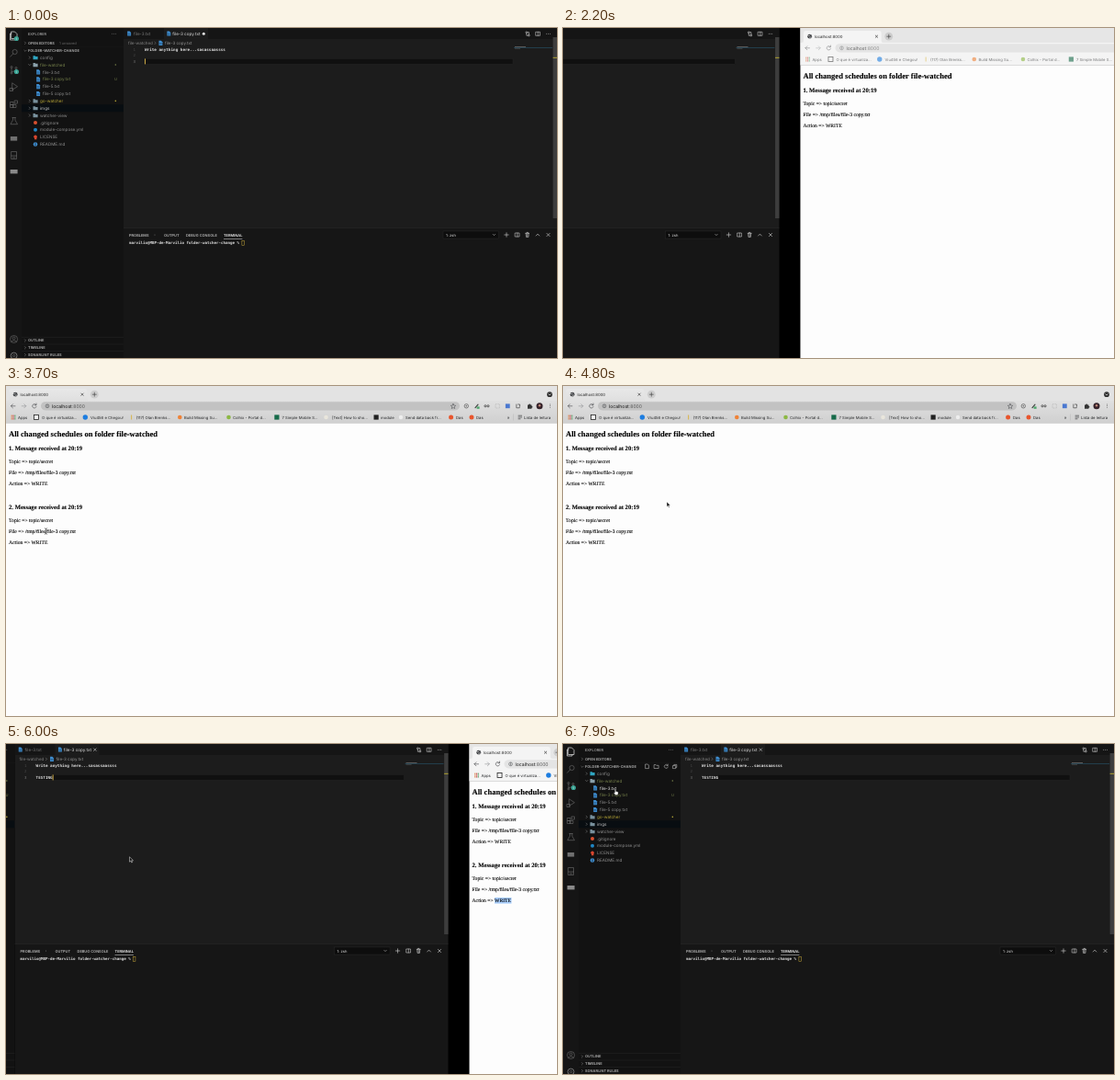
An HTML page that plays this animation: 600 px wide and 359 px high, repeating every 8000 ms.

```html
<!DOCTYPE html>
<html lang="en">
<head>
<meta charset="utf-8">
<title>Folder watcher</title>
<style>
html, body { margin: 0; width: 100%; height: 100%; overflow: hidden; background: #000; }
svg { display: block; width: 100vw; height: 100vh; }
text { font-family: Inter, Roboto, sans-serif; text-rendering: geometricPrecision; white-space: pre; }
.mono { font-family: "DejaVu Sans Mono", "Liberation Mono", monospace; }
.page { font-family: "Liberation Serif", "Noto Serif", serif; stroke: #000; stroke-width: .1; }
.b { font-weight: 700; }
.m { font-weight: 600; }
.line { fill: none; stroke-linecap: round; stroke-linejoin: round; }
</style>
</head>
<body>
<svg id="stage" viewBox="0 0 600 359" preserveAspectRatio="none"></svg>
<script>
const FRAME = 100, LOOP = 8000, SPACE = 623;

// Drawing helpers
const rect = (x, y, w, h, fill, extra = '') =>
  `<rect x="${x}" y="${y}" width="${w}" height="${h}" fill="${fill}" ${extra}/>`;
const dot = (x, y, r, fill) => `<circle cx="${x}" cy="${y}" r="${r}" fill="${fill}"/>`;
const line = (d, color, w = .6) => `<path class="line" d="${d}" stroke="${color}" stroke-width="${w}"/>`;
const text = (x, y, size, fill, str, cls = '', id = '') =>
  `<text x="${x}" y="${y}" font-size="${size}" fill="${fill}" class="${cls}" id="${id}">${str}</text>`;
const group = (id, body, extra = '') => `<g id="${id}" ${extra}>${body}</g>`;
const cross = (x, y, r, c) => line(`M${x - r} ${y - r}l${2 * r} ${2 * r}m0 ${-2 * r}l${-2 * r} ${2 * r}`, c);
const plus = (x, y, r, c) => line(`M${x - r} ${y}h${2 * r}M${x} ${y - r}v${2 * r}`, c);
const ring = (x, y, r, c, w = .6) =>
  `<circle cx="${x}" cy="${y}" r="${r}" fill="none" stroke="${c}" stroke-width="${w}"/>`;
const dots = (x, y, c) => [-1.8, 0, 1.8].map(d => dot(x + d, y, .45, c)).join('');
const chevron = (x, y, open, c) =>
  line(open ? `M${x - 1.2} ${y - .6}l1.2 1.2l1.2 -1.2` : `M${x - .6} ${y - 1.2}l1.2 1.2l-1.2 1.2`, c, .5);
const doc = (x, y) =>
  `<path d="M${x - 1.8} ${y - 2.6}h2.4l1.5 1.5v3.7h-3.9z" fill="#3f8fd2"/>` +
  line(`M${x - .9} ${y}h2M${x - .9} ${y + 1.2}h2`, '#123', .35);
const folder = (x, y, c) =>
  `<path d="M${x - 2.5} ${y - 2}h2l.8 .8h2.3v3.3h-5.1z" fill="${c}"/>`;
const split = (x, y, c) => line(`M${x - 2.2} ${y - 2}h4.4v4h-4.4zM${x} ${y - 2}v4`, c, .55);

// Editor window
const UI = '#8f8f8f', LIGHT = '#d6d6d6', TEAL = '#3aa394';

function activityBar() {
  const c = '#707070', badge = y => dot(11.4, y, 2.6, TEAL) + text(10.6, y + 1.2, 3.2, '#fff', '1');
  return rect(0, 0, 17, 359, '#151515') +
    line('M6 4h3.5l2.5 2.5v5h-6zM6 6h-1.5v7h5.5v-1.5', '#e2e2e2', .7) +
    group('dirty1', badge(11.5)) +
    ring(9.6, 26, 2.6, c) + line('M7.7 28l-3 3.2', c) +
    ring(6, 42.5, 1, c) + ring(6, 49, 1, c) + ring(11, 43.5, 1, c) +
    line('M6 43.5v4.5M11 44.5q0 2.5 -4.5 3', c) + badge(47.5) +
    line('M7 60l5.5 3.7l-5.5 3.5zM4.5 65.5h3v3h-3z', c) +
    line('M5 80.5h3v3h-3zM5 83.5h3v3h-3zM8 83.5h3v3h-3zM9.5 79h3v3h-3z', c) +
    line('M7 97.5h3.4M7.5 97.5v2.6l-2.6 4.6h7.6l-2.6 -4.6v-2.6', c) +
    rect(4.8, 118, 7.4, 4.6, '#707070') +
    line('M6 134.5h5.5v8h-5.5zM6 139h5.5M7.4 141h2.5', c) +
    rect(4.6, 154, 8, 4.4, '#8a8a8a') +
    ring(8.6, 338.5, 4, c) + ring(8.6, 337.5, 1.4, c) + line('M5.8 341.3q2.8 -3 5.6 0', c) +
    ring(8.6, 356.5, 3.4, c, 1) + ring(8.6, 356.5, 1.2, c);
}

function tree() {
  const row = i => 32.2 + i * 7.86;
  const label = (i, x, s, c, id) => text(x, row(i) + 1.6, 4.6, c, s, '', id);
  const dir = (i, s, c, icon, open) =>
    chevron(25.8, row(i), open, UI) + folder(32, row(i), icon) + label(i, 37, s, c);
  const file = (i, s, c, id) => doc(35, row(i)) + label(i, 40, s, c, id);
  const plain = '#919191', olive = '#78834c';
  return rect(17, row(7) - 4, 111, 8, '#080d11') +
    dir(0, 'config', plain, '#2fa5c0') +
    dir(1, 'file-watched', olive, '#8aa0aa', true) + dot(119.3, row(1), .8, olive) +
    file(2, 'file-3.txt', plain, 'hover') +
    file(3, 'file-3 copy.txt', olive) + text(118, row(3) + 1.4, 4, olive, 'U') +
    file(4, 'file-5.txt', plain) +
    file(5, 'file-5 copy.txt', plain) +
    dir(6, 'go-watcher', '#b9a938', '#78909c') + dot(119.3, row(6), .8, '#b9a938') +
    dir(7, 'imgs', '#c4c4c4', '#78909c') +
    dir(8, 'watcher-view', plain, '#78909c') +
    dot(32, row(9), 2, '#d9502f') + label(9, 37, '.gitignore', plain) +
    dot(32, row(10), 2, '#1f86c4') + label(10, 37, 'module-compose.yml', plain) +
    dot(32, row(11) - .4, 1.8, '#d9472f') + rect(31, row(11), 2.4, 2.6, '#d9472f') +
    label(11, 37, 'LICENSE', plain) +
    dot(32, row(12), 2.3, '#3f8fd2') + line(`M32 ${row(12) - .2}v1.4M32 ${row(12) - 1.3}v.1`, '#111') +
    label(12, 37, 'README.md', plain);
}

function sideBar() {
  const head = (y, s, open) => chevron(21, y - 1.4, open, UI) + text(24, y, 3.95, '#a5a5a5', s, 'b');
  const tools = line('M90 22h2.4l1 1v3.6h-3.4zM99.5 22.6h1.6l.6 .7h2.4v3.2h-4.6z', LIGHT, .5) +
    line('M114 23.2a2 2 0 1 0 .3 1.8M114.2 22v1.4h-1.4', LIGHT, .5) +
    line('M119.8 23.6h3v3h-3zM120.8 23.4v-1h3v3h-1', LIGHT, .5);
  return rect(17, 0, 111, 359, '#121212') +
    text(24, 7.7, 3.95, '#c2c2c2', 'EXPLORER') + dots(117.5, 6.3, UI) +
    head(17.7, 'OPEN EDITORS') + text(58, 17.7, 4, '#676767', '1 unsaved', '', 'dirty2') +
    line('M17 20.6h111', '#1d1d1d', .4) + head(26.2, 'FOLDER-WATCHER-CHANGE', true) +
    group('tools', tools) + tree() +
    [336, 343.8, 351.6].map((y, i) => rect(17, y, 111, .4, '#2a2a2a') +
      head(y + 5.4, ['OUTLINE', 'TIMELINE', 'SONARLINT RULES'][i])).join('');
}

function editor() {
  return rect(128, 0, 472, 218, '#1c1c1c') + rect(128, 0, 472, 12, '#151515') +
    rect(172, 0, 48, 12, '#1c1c1c') +
    doc(134, 6) + text(139, 7.8, 4.6, '#7b7b7b', 'file-3.txt') +
    doc(177.2, 6) + text(181.3, 7.8, 4.6, '#e4e4e4', 'file-3 copy.txt') +
    group('dirty3', dot(215.3, 6.2, 1.5, '#e4e4e4')) + group('saved', cross(215.3, 6.2, 1.3, LIGHT)) +
    ring(566.8, 4.8, .9, LIGHT) + ring(569.4, 8, .9, LIGHT) + line('M566.8 5.8v2.4h1.4M569.4 7v-2.4h-1.4', LIGHT) +
    split(579.3, 6.3, LIGHT) + dots(590.5, 6.3, LIGHT) +
    text(133, 18, 4.5, '#838383', 'file-watched') + chevron(162.5, 16.4, false, UI) +
    doc(168.3, 16.4) + text(173, 18, 4.5, '#979797', 'file-3 copy.txt') +
    rect(151, 33.2, 401, 6.3, '#101010', 'stroke="#292929" stroke-width=".4"') +
    [1, 2, 3].map(n => text(138.5, 18.4 + n * 6.43, 4.1, n > 2 ? '#777' : '#484848', n, 'mono')).join('') +
    text(151, 24.8, 4.3, '#e0e0e0', 'Write anything here...sasassaassss', 'mono m') +
    text(151, 37.9, 4.3, '#e0e0e0', '', 'mono m', 'typed') +
    rect(151, 33.4, .9, 6, '#e0b94b', 'id="caret"') +
    rect(554, 20, 12, .7, '#777') + rect(554, 22, 6, .6, '#555') + rect(553, 21.1, 42, .8, '#244758') +
    rect(595.6, 10, 4.4, 197, '#3d3d3d') + rect(595.6, 31.8, 4.4, 1.1, '#a79a30');
}

function terminal() {
  const tab = (x, s, c) => text(x, 226.6, 3.95, c, s, 'm');
  return rect(128, 217.6, 472, 142, '#161616') + rect(128, 217.4, 472, .5, '#2a2a2a') +
    tab(134, 'PROBLEMS', '#bcbcbc') + dot(162, 225, .5, '#777') + tab(172, 'OUTPUT', '#bcbcbc') +
    tab(196, 'DEBUG CONSOLE', '#bcbcbc') + tab(237, 'TERMINAL', '#eee') + rect(237, 229.2, 20.4, .5, '#ddd') +
    rect(476, 221, 60.5, 8, '#0d0d0d', 'stroke="#2d2d2d" stroke-width=".4"') +
    text(479, 226.6, 4.1, '#ddd', '1: zsh') + chevron(531.5, 225, true, LIGHT) +
    plus(545, 225, 2.2, LIGHT) + split(556.8, 225, LIGHT) +
    line('M565.7 223.3h4M567 223.2v-.8h1.4v.8M566.2 223.5l.3 3.9h2.4l.3 -3.9M567.7 224.3v2.3', LIGHT, .6) +
    line('M577.2 226l1.8 -1.9l1.8 1.9', LIGHT) + cross(590.5, 225, 1.6, LIGHT) +
    text(134, 235.4, 4.16, '#dedede', 'marvilio@MBP-de-Marvilio folder-watcher-change %', 'mono m') +
    rect(256.9, 231.7, 2.5, 4.6, 'none', 'stroke="#c9a93a" stroke-width=".5"');
}

// Browser window
function bookmarks() {
  const ink = '#222426';
  const grid = [0, 1, 2, 3, 4, 5, 6, 7, 8].map(i =>
    rect(5.6 + i % 3 * 1.8, 31.6 + (i / 3 | 0) * 1.8, 1.3, 1.3, ['#d85', '#c55', '#6a7'][i % 3])).join('');
  const items = [
    [13, 'Apps'], [39, 'O que é virtualiza...'], [92, 'Viu456 e Chegou!'], [141.5, '(117) Olan Brenks...'],
    [194, 'Build Missing Su...'], [247, 'Colhix - Portal d...'], [300.5, '7 Simple Mobile S...'],
    [355, '[Text] How to sho...'], [408, 'module'], [435, 'Send data back fr...'], [490, 'Das'], [512, 'Das'],
    [564, 'Lista de leitura']
  ];
  return grid + rect(30.5, 31.5, 5, 5, '#f4f4f4', 'stroke="#222" stroke-width=".8"') +
    dot(86.3, 34, 2.7, '#1d7de0') + rect(136.2, 31.5, .9, 5, '#d8b23c') +
    dot(189.3, 34, 2.3, '#ef8236') + dot(242.5, 34, 2.3, '#8cb843') +
    rect(292.3, 31.4, 5.2, 5.2, '#176b4a') + dot(348.5, 34, 2.3, '#e9e6dc') +
    rect(400.5, 31.4, 5.2, 5.2, '#222') + dot(430, 34, 2.2, '#eee') +
    dot(484.6, 34, 2.5, '#e8552d') + dot(507, 34, 2.5, '#e8552d') +
    text(545.8, 35.5, 4.6, ink, '»') + rect(552.5, 30.5, .4, 7, '#b0b0b0') +
    line('M558 32.2h3.6M558 34h3.6M558 35.8h2', ink) +
    items.map(([x, s]) => text(x, 35.5, 4.22, ink, s)).join('');
}

function toolbar() {
  const c = '#3f4144';
  return line('M10 21.8h-4.6l2 -2m-2 2l2 2', c) + line('M17.2 21.8h4.6l-2 -2m2 2l-2 2', '#8f9194') +
    line('M32.8 20.6a2.2 2.2 0 1 0 .2 2M33 19v1.8h-1.8', c) +
    ring(45, 21.8, 1.9, c, .5) + line('M45 21.5v1.3M45 20.6v.1', c, .5) +
    `<text x="50" y="23.6" font-size="5.1" fill="#151515">localhost<tspan fill="#555">:8000</tspan></text>` +
    line('M487 19.4l.8 1.7l1.9 .2l-1.4 1.3l.4 1.9l-1.7 -1l-1.7 1l.4 -1.9l-1.4 -1.3l1.9 -.2z', c, .5) +
    ring(501.3, 21.8, 2.2, '#555', .7) + dot(501.3, 21.8, .7, '#555') +
    line('M511 23.6l3 -3.4', '#444', 1.2) + rect(512.6, 22.4, 3, 2.4, '#4ca66a') +
    ring(522, 21.8, 1.1, '#333', .7) + ring(525, 21.8, 1.1, '#333', .7) +
    rect(533, 19.6, 4.4, 4.4, 'none', 'stroke="#aaa" stroke-width=".5" stroke-dasharray="1 .6"') +
    rect(543.9, 19.4, 4.8, 4.8, '#4a78d0') + line('M555.8 20v3.8h3.4v-1M557.5 20h2v2', '#444', .7) +
    `<path d="M568 20.4h1.2a1 1 0 0 1 2 0h1.2v1.3a1 1 0 0 1 0 2v1h-4.4z" fill="#333"/>` +
    dot(581, 21.8, 3.5, '#35222a') + dot(581, 21.2, 1.2, '#c08878') +
    [-1.8, 0, 1.8].map(d => dot(592.6, 21.8 + d, .45, '#333')).join('');
}

function message(n, y, id) {
  const p = (dy, s) => text(3, y + dy, 5.66, '#000', s, 'page');
  return group(id, text(3, y, 6.65, '#000', n + '. Message received at 20:19', 'page b') +
    p(13.5, 'Topic =&gt; topic/secret') + p(25.6, 'File =&gt; /tmp/files/file-3 copy.txt') +
    p(37.7, 'Action =&gt; WRITE'));
}

function browser() {
  const metal = `<linearGradient id="metal" gradientUnits="userSpaceOnUse" x1="0" y1="3" x2="0" y2="40">
    <stop stop-color="#e8e8e8"/><stop offset="1" stop-color="#d0d0d0"/></linearGradient>`;
  return metal + rect(0, 0, 600, 359, '#fdfdfd') + rect(0, 0, 600, 16, '#e3e3e3', 'id="strip"') +
    '<path d="M1.5 16q2 0 2 -2v-8.5q0 -2.4 2.4 -2.4h80q2.4 0 2.4 2.4v8.5q0 2 2 2z" id="tab"/>' +
    rect(0, 16, 600, 24.2, '#ddd', 'id="bar"') + rect(0, 40, 600, .5, '#b8b8b8') +
    rect(38, 17.2, 456, 9.2, '#c2c2c2', 'rx="4.6" id="pill"') +
    dot(10.2, 9.2, 2.4, '#3f4144') + line('M8.6 8.6q1.4 1 2 -.6M9.6 11q1 -1.6 2.4 -1', '#eee', .6) +
    text(15.4, 10.8, 4.35, '#222', 'localhost:8000') + cross(83, 9.2, 1.2, '#222') +
    dot(96.3, 9.2, 4.4, '#cdcdcd') + plus(96.3, 9.2, 2, '#333') +
    dot(592, 9.2, 2.9, '#333') + line('M590.8 8.8l1.2 1.2l1.2 -1.2', '#fff') +
    group('chrome', toolbar() + bookmarks()) +
    rect(27.5, 167, 18.4, 6.6, '#a8cdfb', 'id="select"') +
    text(3, 55.2, 8.55, '#000', 'All changed schedules on folder file-watched', 'page b') +
    message(1, 70.4, 'first') + message(2, 134.4, 'second');
}

const pointers = {
  arrow: '<path d="M0 0v5.4l1.3 -1.2l.9 2l.9 -.4l-.9 -1.9h1.8z" fill="#111" stroke="#fff" stroke-width=".45"/>',
  beam: line('M-1.2 -3.2q1.2 0 1.2 .8q0 -.8 1.2 -.8M0 -2.4v4.8M-1.2 3.2q1.2 0 1.2 -.8q0 .8 1.2 .8', '#222', .55),
  hand: '<path d="M-.6 -.5q.7 -.7 1.2 0v2l2 .5q.8 .4 .5 1.6l-.5 2h-2.6l-1.7 -2.4q.1 -.8 1.1 -.2z" fill="#fff" stroke="#222" stroke-width=".4"/>'
};

document.getElementById('stage').innerHTML =
  group('ide', activityBar() + sideBar() + editor() + terminal()) +
  group('web', browser()) +
  group('mouse', Object.entries(pointers).map(([k, d]) => group(k, d)).join(''));

// Timeline
const $ = id => document.getElementById(id);
const show = (id, on) => $(id).setAttribute('visibility', on ? 'inherit' : 'hidden');
const paint = (id, color) => $(id).setAttribute('fill', color);
const move = (id, x, y) => $(id).setAttribute('transform', `translate(${x.toFixed(2)} ${y.toFixed(2)})`);

// time, x, y, pointer until the next stop
const route = [
  [2800, 112, 74, 'arrow'], [3500, 43, 158, 'beam'], [3900, 44, 158, 'arrow'], [4600, 114, 125, 'arrow'],
  [4800, 113, 126, 'arrow'], [5200, 39, 171, 'beam'], [5500, 39, 171, 'arrow'], [5900, 132.4, 123.4, 'arrow'],
  [6000, 134.5, 122.8, 'arrow'], [6400, 134.5, 122.8, 'arrow'], [7200, 72, 72, 'hand'], [7800, 57, 50, 'hand'],
  [8000, 57, 50, 'hand']
];

function pan(t) {
  if (t < 2147) return 0;
  const decay = from => Math.exp(-16.6 * (t - from) / 1000);
  const x = t <= 5900 ? SPACE * (1 - decay(2147)) : SPACE * decay(5900);
  return x < 1 ? 0 : x > SPACE - 1 ? SPACE : x;
}

function moveMouse(t) {
  const i = route.findIndex(stop => stop[0] > t) - 1;
  show('mouse', i >= 0);
  if (i < 0) return;
  const [t0, x0, y0, kind] = route[i], [t1, x1, y1] = route[i + 1];
  const u = (t - t0) / (t1 - t0), e = u * u * (3 - 2 * u);
  move('mouse', x0 + (x1 - x0) * e, y0 + (y1 - y0) * e);
  for (const k in pointers) show(k, k === kind);
}

function draw(t) {
  const x = pan(t);
  move('ide', -x, 0);
  move('web', SPACE - x, 0);

  const count = Math.min(7, Math.max(0, t / FRAME - 1));
  $('typed').textContent = 'TESTING'.slice(0, count);
  $('caret').setAttribute('x', 151 + count * 2.59);
  show('caret', t < 1000 || t % 1000 < 500);

  const dirty = t < 1600;
  ['dirty1', 'dirty2', 'dirty3'].forEach(id => show(id, dirty));
  show('saved', !dirty);

  // The browser gains focus once the swipe settles, and loses it on the way back
  const active = t >= 2500 && t < 6000;
  $('chrome').setAttribute('opacity', t >= 2500 ? 1 : .6);
  paint('strip', active ? '#e3e3e3' : '#e6e6e6');
  paint('tab', active ? 'url(#metal)' : '#f4f4f4');
  paint('bar', active ? 'url(#metal)' : '#f4f4f4');
  paint('pill', active ? '#c2c2c2' : '#e4e4e4');
  show('second', t >= 2500);
  show('select', t >= 5500);

  show('tools', t >= 7000);
  paint('hover', t >= 7700 ? '#f0f0f0' : '#919191');
  moveMouse(t);
}

function tick() {
  draw(Math.floor(performance.now() % LOOP / FRAME) * FRAME);
  requestAnimationFrame(tick);
}
tick();
</script>
</body>
</html>
```
